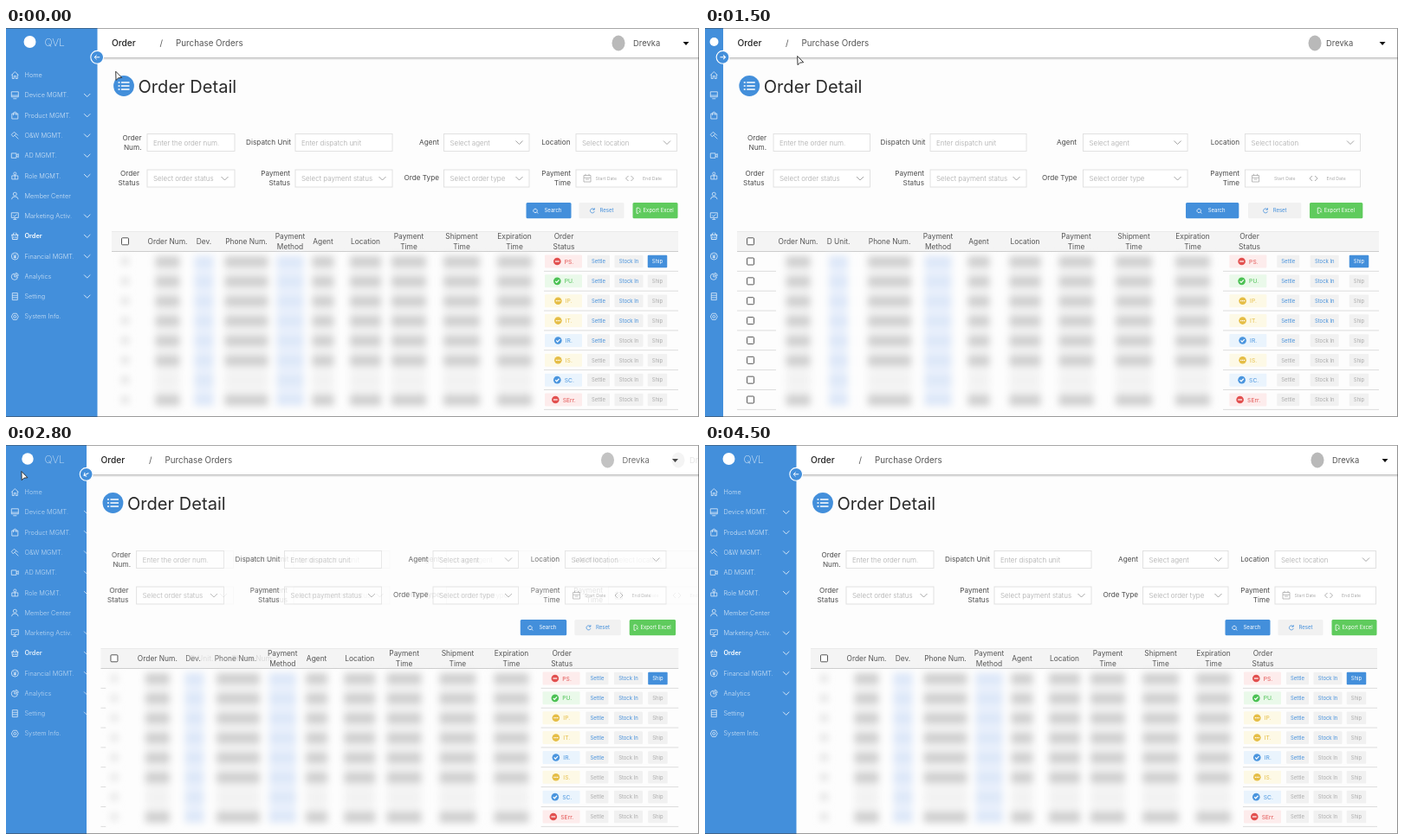
These frames come from a looping animation (800 by 450 pixels, 5100 ms). An HTML page:

```html
<!DOCTYPE html>
<html lang="en">
<head>
<meta charset="utf-8">
<title>Order Detail</title>
<style>
  html, body { margin: 0; width: 100%; height: 100%; overflow: hidden; background: #fdfdfd; }
  svg { display: block; width: 800px; height: 450px; }
  text { font-family: Inter, "Noto Sans", sans-serif; white-space: pre; }
</style>
</head>
<body>
<script>
const LOOP = 5100, STEP = 100, SHIFT = 84.5;
const BLUE = '#438fdb', GREY = '#aaa';
const links = [];

function el(parent, tag, attrs = {}) {
  const node = document.createElementNS('http://www.w3.org/2000/svg', tag);
  for (const key in attrs) node.setAttribute(key, attrs[key]);
  parent.append(node);
  return node;
}
const lerp = (a, b, p) => a + (b - a) * p;

function label(parent, x, y, str, size, fill, opts = {}) {
  const t = el(parent, 'text', { x, y: y + size * 0.36, 'font-size': size, fill, ...opts });
  t.textContent = str;
  return t;
}
const rect = (parent, x, y, width, height, fill, opts) =>
  el(parent, 'rect', { x, y, width, height, fill, ...opts });
const line = (parent, d, stroke, width = 1, opts) =>
  el(parent, 'path', { d, fill: 'none', stroke, 'stroke-width': width, ...opts });

// Group that slides from x = a (menu open) to x = b (menu closed).
function slide(parent, a, b, y = 0) {
  const g = el(parent, 'g');
  links.push(p => g.setAttribute('transform', `translate(${lerp(a, b, p)} ${y})`));
  return g;
}
function tween(node, attr, a, b) {
  links.push(p => node.setAttribute(attr, lerp(a, b, p)));
}
// Two versions of one block that cross-fade while riding with the page.
function swap(parent, draw) {
  [0, 1].forEach(state => {
    const g = slide(parent, state * SHIFT, state * SHIFT - SHIFT);
    tween(g, 'opacity', 1 - state, state);
    draw(g, state);
  });
}

const svg = el(document.body, 'svg', { viewBox: '0 0 800 450' });
const defs = el(svg, 'defs');
const soft = el(defs, 'filter', { id: 'soft', x: '-5%', y: '-5%', width: '110%', height: '110%' });
el(soft, 'feGaussianBlur', { stdDeviation: 4 });
rect(svg, 0, 0, 800, 450, '#fdfdfd');

const MID = { 'text-anchor': 'middle' }, END = { 'text-anchor': 'end' };
const down = (g, x, y, color, s = 4) =>
  line(g, `M${x - s} ${y - s / 2}l${s} ${s}l${s} ${-s}`, color, 0.9);

// Title
const title = slide(svg, 136, 51.2, 67);
el(title, 'circle', { r: 11.9, fill: BLUE });
for (const y of [-4, 0, 4]) line(title, `M-6.5 ${y}h2M-3 ${y}h9.5`, '#fff', 1.6);
label(title, 16.5, 0.5, 'Order Detail', 20.1, '#2b2b2b');

// Filter fields
const FIELDS = [
  { box: [[163, 101], [79, 111.5]], top: ['Order', 'Num.'], low: ['Order', 'Status'],
    hint: ['Enter the order num.', 'Select order status'], end: [[156.5, 154], [71, 68.5]], pick: [0, 1] },
  { box: [[334, 112], [260, 111]], top: ['Dispatch Unit'], low: ['Payment', 'Status'],
    hint: ['Enter dispatch unit', 'Select payment status'], end: [[329, 328], [254.5, 253]], pick: [0, 1] },
  { box: [[505.5, 98.5], [436.5, 120.5]], top: ['Agent'], low: ['Orde Type'],
    hint: ['Select agent', 'Select order type'], end: [[500, 500], [429, 429.5]], pick: [1, 1] },
  { box: [[658, 116.5], [623.5, 133]], top: ['Location'], low: ['Payment', 'Time'],
    hint: ['Select location', ''], end: [[651.5, 652], [617, 617]], pick: [1, 0] }
];
swap(svg, (g, state) => FIELDS.forEach(f => {
  const [x, w] = f.box[state];
  [f.top, f.low].forEach((words, row) => {
    const y = row ? 174 : 132.5;
    rect(g, x, y - 10, w, 20, '#fff', { stroke: '#dedede', 'stroke-width': 0.9 });
    label(g, x + 7, y + 0.5, f.hint[row], 8, '#a9a9a9', { 'font-weight': 300 });
    if (f.pick[row]) down(g, x + w - 11.5, y, '#999');
    words.forEach((word, i) => {
      const dy = words.length > 1 ? i * 11 - 5.5 : -0.5;
      label(g, f.end[state][row], y + dy, word, 8.2, '#4a4a4a', END);
    });
  });
  if (f.hint[1]) return;
  const [icon, from, mark, to] = state ? [12, 33.5, 79, 94] : [13, 22.5, 62, 77];
  line(g, `M${x + icon - 4} 170.5h8v7.5h-8zm0 2.7h8m-6 -4.4v2m4 -2v2m-4 4.2h4`, '#aaa', 0.8);
  line(g, `M${x + mark - 1.5} 171l-3 3l3 3m3 0l3 -3l-3 -3`, '#999', 0.8);
  label(g, x + from, 174.3, 'Start Date', 5.2, GREY);
  label(g, x + to, 174.3, 'End Date', 5.2, GREY);
}));

// Action buttons
const ACTIONS = [
  ['Search', 600.5, 555, BLUE, '#fff', 'M-15.5 -2a2.2 2.2 0 1 0 .01 0zm1.6 3.7l1.6 1.6', -5],
  ['Reset', 661.5, 627, '#f1f1f1', BLUE, 'M-8.5 -1.2a2.5 2.5 0 1 0 .3 2.2M-8.2 -3v2h-2', -2],
  ['Export Excel', 723.5, 698, '#5fcb5d', '#fff', 'M-17.5 -.5v-1l-1.5 -1.6h-2.4v6.2h2M-18.8 .2l2 2m0 -2l-2 2', -14]
];
for (const [name, a, b, fill, ink, icon, tx] of ACTIONS) {
  const w = [52, 61.3];
  const box = rect(svg, a, 202, w[0], 18.3, fill, { rx: 1.5 });
  tween(box, 'x', a, b);
  tween(box, 'width', ...w);
  const g = slide(svg, a + w[0] / 2, b + w[1] / 2, 211.2);
  line(g, icon, ink, 0.8);
  label(g, tx, 0, name, 6, ink);
}

// Table
const ROWS = 8, rowY = i => 270 + i * 22.86;
const table = el(svg, 'g');
function bar(y, height, fill) {
  const r = rect(table, 122, y, 654, height, fill);
  tween(r, 'x', 122, 37);
  tween(r, 'width', 654, 741);
}
bar(235.5, 23, '#f4f4f4');
bar(235, 0.6, '#e2e2e2');
for (let i = 0; i <= ROWS; i++) bar(258 + i * 22.86, 0.9, i ? '#d9d9d9' : '#c9c9c9');

const tick = slide(table, 137.5, 52.5);
for (let i = -1; i < ROWS; i++) {
  rect(tick, -4, (i < 0 ? 246.8 : rowY(i)) - 4, 8, 8, '#fff',
    { rx: 1, stroke: '#444', 'stroke-width': 0.9 });
}

// name, open x, closed x, blurred width
const COLUMNS = [
  ['Order Num.', 186.5, 107.5, 28],
  ['Dev.|D Unit.', 228.5, 154, 22],
  ['Phone Num.', 277.5, 213, 50],
  ['Payment Method', 328, 269, 31],
  ['Agent', 366, 316, 25],
  ['Location', 415, 369.5, 36],
  ['Payment Time', 465, 428.5, 40],
  ['Shipment Time', 526, 495, 42],
  ['Expiration Time', 587, 563, 40],
  ['Order Status', 644, 628.5, 0]
];
const INK = '#555';
COLUMNS.forEach(([name, a, b], i) => {
  if (i === 1 || i === 2) {
    const names = name.split('|');
    swap(table, (g, s) => label(g, s ? b : a, 247, names[s] || name, 8.4, INK, MID));
    return;
  }
  const words = i === 0 ? [name] : name.split(' ');
  const g = slide(table, a, b);
  words.forEach((word, k) =>
    label(g, 0, words.length > 1 ? 241 + k * 12 : 247, word, 8.4, INK, MID));
});

// Obscured cells
const cover = rect(table, 121, 259, 500, 190, '#fdfdfd');
tween(cover, 'x', 121, 82);
tween(cover, 'width', 500, 516);
const haze = el(table, 'g', { filter: 'url(#soft)' });
COLUMNS.forEach(([, a, b, w], i) => {
  if (!w) return;
  const g = slide(haze, a, b);
  const blue = i === 1 || i === 3;
  rect(g, -w / 2, 263, w, 174, blue ? '#eaf1fc' : '#f5f5f5');
  for (let r = 0; r < ROWS; r++) {
    const faint = r === 6;
    rect(g, -w / 2, rowY(r) - 6, w, 13, blue ? '#dbe6f8' : '#c9c9c9',
      { opacity: faint ? (blue ? 0.8 : 0.08) : 0.85 });
  }
});
const ghost = slide(haze, 137.5, 52.5);
tween(ghost, 'opacity', 1, 0);
for (let r = 0; r < ROWS; r++) rect(ghost, -4, rowY(r) - 4, 8, 8, '#dcdcdc');

// Row states and buttons
const KINDS = {
  stop: ['#e2504f', '#fdecec', 'M-2.4 0h4.8'],
  done: ['#4bc153', '#eaf9ea', 'M-2.1 0l1.5 1.6l2.8 -3'],
  wait: ['#e5bd45', '#fdf9e6', 'M-2.5 0h1.3m.6 0h1.3m.6 0h1.3'],
  info: ['#4a95de', '#eaf4fd', 'M-2.1 0l1.5 1.6l2.8 -3']
};
const STATES = [['PS.', 'stop'], ['PU.', 'done'], ['IP.', 'wait'], ['IT.', 'wait'],
  ['IR.', 'info'], ['IS.', 'wait'], ['SC.', 'info'], ['SErr.', 'stop']];
STATES.forEach(([name, kind], r) => {
  const y = rowY(r), [ink, fill, mark] = KINDS[kind];
  const chip = slide(table, 643.5, 626.8, y);
  const dx = name.length > 3 ? -2 : name[0] === 'I' ? 1 : 0;
  rect(chip, -21.5, -7.5, 43, 15, fill, { rx: 1 });
  const dot = el(chip, 'g', { transform: `translate(${dx - 7.2} 0)` });
  el(dot, 'circle', { r: 4.3, fill: ink });
  line(dot, mark, '#fff', 1.2);
  label(dot, 8.5, 0.2, name, 6.7, ink);
  const button = (str, a, b, w, on, solid) => {
    const g = slide(table, a, b, y);
    rect(g, -w / 2, -7.3, w, 14.6, solid ? BLUE : '#f1f1f1', { rx: 1 });
    label(g, 0, 0.2, str, 5.9, solid ? '#fff' : on ? BLUE : GREY, MID);
  };
  button('Settle', 684, 673.2, 26, r < 5);
  button('Stock In', 719, 715.2, 33, r < 4);
  button('Ship', 752, 755, 22.5, false, r === 0);
});

// Top bar
rect(svg, 0, 0, 800, 34, '#fff');
rect(svg, 0, 34, 800, 1.4, '#c4c4c4');
rect(svg, 0, 35.4, 800, 1.6, '#000', { opacity: 0.06 });
const crumbs = slide(svg, 122, 37.5, 17.5);
label(crumbs, 0, 0, 'Order', 10.2, '#222', { 'font-weight': 500 });
label(crumbs, 55.5, 0, '/', 9.8, '#555');
label(crumbs, 74, 0, 'Purchase Orders', 9.8, '#555');
swap(svg, (g, s) => {
  el(g, 'ellipse', { cx: s ? 704 : 707, cy: 17.5, rx: 7.5, ry: 9, fill: '#b9b9b9' });
  label(g, s ? 717 : 724, 17.8, 'Drevka', 9.4, '#555');
  el(g, 'path', { d: `M${s ? 778.5 : 781.5} 16h7l-3.5 4z`, fill: '#111' });
});

// Side menu
const clip = el(el(defs, 'clipPath', { id: 'menu' }), 'rect', { width: 105.5, height: 450 });
tween(clip, 'width', 105.5, 21);
const menu = el(svg, 'g', { 'clip-path': 'url(#menu)' });
rect(menu, 0, 0, 106, 450, BLUE);
const names = el(menu, 'g');
tween(names, 'opacity', 1, 0);
const logo = el(slide(menu, 27.5, 10.5, 16), 'circle', { r: 7, fill: '#fff' });
tween(logo, 'r', 7, 5);
label(names, 44.5, 16.5, 'QVL', 12, '#d9e9f8', { 'font-weight': 200 });

const ring = r => `M${-r} 0a${r} ${r} 0 1 0 ${2 * r} 0a${r} ${r} 0 1 0 ${-2 * r} 0`;
const ITEMS = [
  ['Home', 'M-4 0L0 -4L4 0M-3 -1V4H-1V1H1V4H3V-1'],
  ['Device MGMT.', 'M-4 -4H4V2H-4ZM-2 4H2M-4 .3H4', 1],
  ['Product MGMT.', 'M-3.5 -2H3.5V4H-3.5ZM-1.7 0V-3Q0 -5 1.7 -3V0', 1],
  ['O&W MGMT.', 'M-4 -1L-1 -4L1.5 -2L-2 1.5ZM0 0L4 4M1.5 -2L3.5 0', 1],
  ['AD MGMT.', 'M-4 -2.7H1.7V2.7H-4ZM1.7 -.6L4 -2V2L1.7 .6', 1],
  ['Role MGMT.', 'M-1.5 -2.5a1.5 1.5 0 1 0 3 0a1.5 1.5 0 1 0 -3 0M-3.5 0H3.5V4H-3.5ZM0 -1V4', 1],
  ['Member Center', 'M-2 -2a2 2 0 1 0 4 0a2 2 0 1 0 -4 0M-3.8 4Q-3.5 .8 0 .8T3.8 4'],
  ['Marketing Activ.', 'M-4 -3.7H4V2H-4ZM-2 4H2M0 2V4M-2 -.6L-.4 .6L2.2 -2', 1],
  ['Order', 'M-4 -1.4H4M-3.4 -1.4L-2.8 3.8H2.8L3.4 -1.4M-2.4 -1.4L-1 -4M2.4 -1.4L1 -4M-1.2 .4V2.4M1.2 .4V2.4', 1],
  ['Financial MGMT.', ring(4) + 'M-1.8 -2.2L0 -.2L1.8 -2.2M0 -.2V2.6M-1.6 .2H1.6M-1.6 1.4H1.6', 1],
  ['Analytics', 'M-.6 -3.2A3.6 3.6 0 1 0 3.2 .6H-.6ZM1 -4V-1H4Q3.8 -3.6 1 -4', 1],
  ['Setting', 'M-3 -4H3V4H-3ZM-3 -1.3H3M-3 1.3H3', 1],
  ['System Info.', ring(1.5) + 'M-2 -3.6H2L4 0L2 3.6H-2L-4 0Z']
];
ITEMS.forEach(([name, icon, more], i) => {
  const y = 54.5 + i * 23.28, on = name === 'Order';
  const ink = on ? '#fff' : '#d3e5f6';
  line(menu, icon, on ? '#fff' : '#e0edf9', 0.8, { transform: `translate(10.3 ${y})` });
  label(names, 21.5, y, name, 7.3, ink, { 'font-weight': on ? 600 : 300 });
  if (more) down(names, 93.7, y, '#e6f0fa', 3.6);
});

// Menu toggle
const toggle = slide(svg, 105.2, 20.5, 33.8);
el(toggle, 'circle', { r: 7.4, fill: BLUE, stroke: '#fff', 'stroke-width': 1.1 });
const arrow = line(toggle, 'M3 0H-3M-.6 -2.4L-3 0L-.6 2.4', '#fff', 1);
links.push(p => arrow.setAttribute('transform', `rotate(${-180 * p})`));

// Window edge
line(svg, 'M0 .3H799.5V449.6H0', '#3a3a3a', 0.8, { opacity: 0.7 });

// Pointer
const pointer = el(svg, 'g');
const PEN = { fill: '#fff', stroke: '#222', 'stroke-width': 0.9, 'stroke-linejoin': 'round' };
const tip = el(pointer, 'path', { d: 'M0 0L.3 10.2L2.9 7.7L7 7.2Z', ...PEN });
const hand = el(pointer, 'path', {
  d: 'M-1.2 1Q0 -.7 1.2 1V4Q4.7 4 5 5.8V7.4Q4.8 9 4 10.3H-.8L-3.5 6.6Q-3.2 5.3 -1.2 6.5Z', ...PEN
});

const unit = (t, from, span) => Math.min(1, Math.max(0, (t - from) / span));
const easeOut = u => 1 - (1 - u) ** 2;
const smooth = u => u * u * (3 - 2 * u);

function render(t) {
  const p = easeOut(unit(t, 1246, 260)) - easeOut(unit(t, 2640, 260));
  links.forEach(apply => apply(p));
  const go = smooth(unit(t, 0, 600)), back = smooth(unit(t, 1700, 700));
  const x = 126.7 - 20 * go - 88.8 * back, y = 50.2 - 17.7 * go - 2 * back;
  pointer.setAttribute('transform', `translate(${x} ${y})`);
  pointer.setAttribute('opacity', 1 - unit(t, 3700, 300));
  const over = (t >= 500 && t < 1246) || (t >= 2300 && t < 2640);
  tip.setAttribute('opacity', over ? 0 : 1);
  hand.setAttribute('opacity', over ? 1 : 0);
}

let shown = -1;
function tickFrame() {
  const t = Math.floor(performance.now() % LOOP / STEP) * STEP;
  if (t !== shown) render(shown = t);
  requestAnimationFrame(tickFrame);
}
tickFrame();
</script>
</body>
</html>
```
